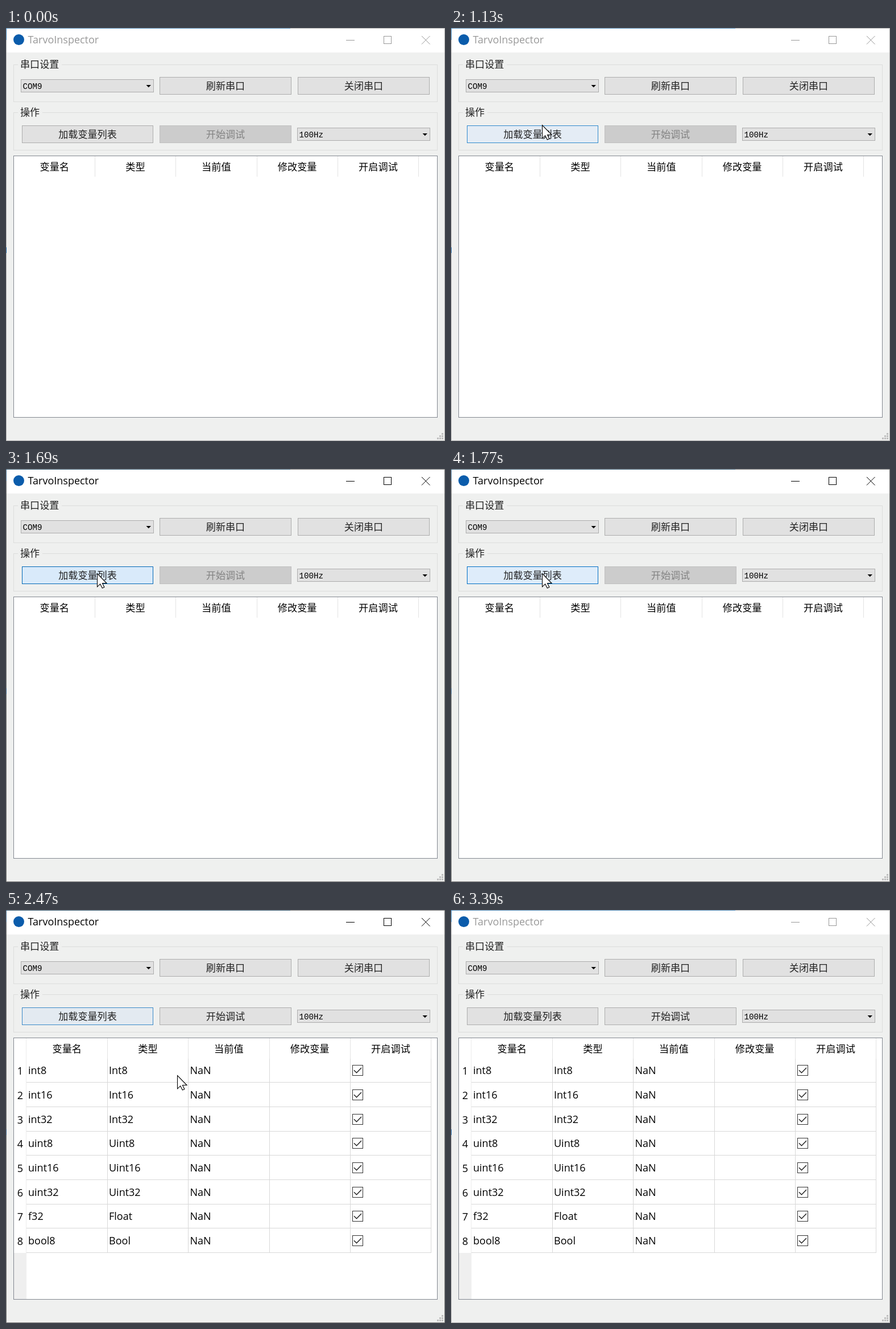
An HTML page that plays this animation: 772 by 725 pixels, repeating every 3560 ms.

```html
<!DOCTYPE html>
<html lang="zh-CN">
<head>
<meta charset="utf-8">
<title>Serial variable window</title>
<style>
  html, body { margin: 0; width: 100%; height: 100%; overflow: hidden; background: #eff0ef; }
  svg { display: block; width: 772px; height: 725px; }
  rect, .line { shape-rendering: crispEdges; }
  .ui { font: 18px "Open Sans", "Noto Sans", sans-serif; }
  .head { font: 17.2px "Noto Sans CJK SC", "Noto Sans CJK", sans-serif; }
  .song { font: 300 17.1px "Noto Sans CJK SC Light", "Noto Sans CJK SC DemiLight", "Noto Sans CJK SC", "Noto Sans CJK", sans-serif; }
  .mono { font: 14.2px "Liberation Mono", monospace; }
  .mid { text-anchor: middle; }
</style>
</head>
<body>
<svg id="stage" viewBox="0 0 772 725" xmlns="http://www.w3.org/2000/svg"></svg>
<script>
const NS = "http://www.w3.org/2000/svg";
const LOOP = 3560;
const ACTIVE_AT = 1370, LOADED_AT = 1840, INACTIVE_AT = 3390;

// time, tip x, tip y; a bare time hides the pointer
const POINTER = [
  [0],
  [510, 273, 601], [590, 222, 520], [670, 172, 420], [740, 143, 340],
  [820, 134, 279], [900, 140, 232], [980, 150, 200],
  [1050, 157, 180], [1130, 160, 170], [1220, 160, 183],
  [2320, 167, 190], [2390, 225, 233], [2470, 301, 290], [2530, 357, 367],
  [2610, 415, 470], [2690, 460, 580], [2770, 491, 700],
  [2840]
];

// time, fill, border
const LOAD_BUTTON = [
  [0, "#e1e1e1", "#adadad"],
  [1050, "#e2e5e8", "#8ba1b3"],
  [1130, "#e4ecf5", "#3089cd"],
  [1220, "#e5f1fb", "#0078d7"],
  [1450, "#d9ebf9", "#0068b8"],
  [1530, "#cce4f7", "#005499"],
  [1610, "#d2e7f8", "#005ea9"],
  [1690, "#d9eafa", "#0067b6"],
  [1770, "#deecfa", "#006ec4"],
  [1840, "#e1eefa", "#0074cf"],
  [2320, "#e5f1fb", "#0078d7"],
  [2390, "#e4eef7", "#1b7ed1"],
  [2470, "#e3eaf1", "#3a89c8"],
  [2530, "#e2e6ea", "#7198b9"],
  [2610, "#e1e3e5", "#98a5b0"],
  [2690, "#e1e1e1", "#adadad"]
];

const HEADERS = ["变量名", "类型", "当前值", "修改变量", "开启调试"];
const ROWS = ["int8", "int16", "int32", "uint8", "uint16", "uint32", "f32", "bool8"];
const TYPES = ["Int8", "Int16", "Int32", "Uint8", "Uint16", "Uint32", "Float", "Bool"];
const COL = 142.3, ROW = 42.7;
const INK = "#222";

const stage = document.getElementById("stage");

function add(parent, tag, attrs, text) {
  const el = document.createElementNS(NS, tag);
  for (const key in attrs) el.setAttribute(key, attrs[key]);
  if (text) el.textContent = text;
  parent.appendChild(el);
  return el;
}
const group = (parent = stage) => add(parent, "g", {});
const fillBox = (p, x, y, width, height, fill) => add(p, "rect", { x, y, width, height, fill });
const frame = (p, x, y, w, h, fill, stroke) =>
  add(p, "rect", { x: x + .5, y: y + .5, width: w - 1, height: h - 1, fill, stroke });
const label = (p, x, y, text, cls, fill = "#000") => add(p, "text", { x, y, class: cls, fill }, text);

function button(x, y, w, h, text) {
  const box = frame(stage, x, y, w, h, "#e1e1e1", "#adadad");
  const caption = label(stage, x + w / 2, y + 22, text, "song mid", INK);
  return { box, caption };
}

function combo(x, y, text) {
  frame(stage, x, y, 234, 23, "#e1e1e1", "#adadad");
  label(stage, x + 3.5, y + 17, text, "mono");
  add(stage, "path", { d: `M${x + 220.5} ${y + 10}h8.5l-4.25 4.25z` });
}

function fieldset(y, h, title, gap) {
  frame(stage, 13, y, 746, h, "none", "#dcdddc");
  fillBox(stage, 21, y - 1, gap, 3, "#eff0ef");
  label(stage, 25, y + 5.5, title, "song", INK);
}

function headerRow(parent, left) {
  HEADERS.forEach((text, i) => {
    label(parent, left + COL * (i + .5) + .4, 250, text, "head mid");
    fillBox(parent, Math.round(left + COL * (i + 1)), 225, 1, 36, "#e3e3e3");
  });
}

function filledTable(parent) {
  headerRow(parent, 35.7);
  fillBox(parent, 14, 602, 22, 81, "#efefef");
  fillBox(parent, 35, 225, 1, 377, "#ececec");
  for (let i = 1; i <= HEADERS.length; i++)
    fillBox(parent, Math.round(35.7 + COL * i), 261, 1, 341, "#d8d8d8");
  ROWS.forEach((name, i) => {
    const dy = Math.round(ROW * i + .2), base = 288 + dy;
    label(parent, 25, base + 1, String(i + 1), "ui mid");
    label(parent, 39, base, name, "ui");
    label(parent, 181, base, TYPES[i], "ui");
    label(parent, 323.5, base, "NaN", "ui");
    fillBox(parent, 36, 302 + dy, 712, 1, "#d8d8d8");
    frame(parent, 609, 272 + dy, 19, 19, "#fff", "#333");
    add(parent, "path", {
      d: `M612 ${281.3 + dy}l4.5 4.5 8.5-8.7`,
      fill: "none", stroke: "#222", "stroke-width": 1.5
    });
  });
}

// window
fillBox(stage, 0, 0, 772, 725, "#eff0ef");
fillBox(stage, 1, 1, 770, 42, "#fff");
const edge = frame(stage, 0, 0, 772, 725, "none", "#aaa");
const topEdge = fillBox(stage, 0, 0, 500, 1, "#4d87b5");
const sideEdge = group();
fillBox(sideEdge, 0, 1, 1, 20, "#3c7fb5");
fillBox(sideEdge, 0, 385, 1, 10, "#1d62a0");

add(stage, "circle", { cx: 22.5, cy: 20.5, r: 9.5, fill: "#0b5cab" });
const title = label(stage, 38.5, 27, "TarvoInspector", "ui");
const controls = add(stage, "g", { fill: "none" });
add(controls, "path", { d: "M598 21.5h15M664.5 14.5h13v13h-13z", class: "line" });
add(controls, "path", { d: "M731 14l14.5 14.5M745.5 14l-14.5 14.5" });

fieldset(64, 66, "串口设置", 77);
combo(26, 90, "COM9");
button(270, 86, 232, 31, "刷新串口");
button(513, 86, 232, 31, "关闭串口");

fieldset(148, 67, "操作", 43);
const load = button(28, 171, 231, 31, "加载变量列表");
const start = button(270, 171, 232, 31, "开始调试");
combo(512, 175, "100Hz");

frame(stage, 13, 224, 746, 460, "#fff", "#828790");
const emptyView = group();
headerRow(emptyView, 13.7);
const fullView = group();
filledTable(fullView);

// size grip
for (let r = 0; r < 3; r++)
  for (let c = 2 - r; c < 3; c++)
    fillBox(stage, 758 + c * 4, 711 + r * 4, 3, 3, "#bfbfbf");

const pointer = add(stage, "path", {
  d: "M0 0V23.3L5.2 18.4 8.8 25.5 12.4 23.9 9 17H16.5Z",
  fill: "#fff", stroke: "#000", "stroke-width": 1.1
});

const at = (steps, t) => steps.findLast(step => step[0] <= t);

function paint(el, fill, stroke) {
  el.setAttribute("fill", fill);
  el.setAttribute("stroke", stroke);
}

function render(t) {
  const active = t >= ACTIVE_AT && t < INACTIVE_AT;
  const loaded = t >= LOADED_AT;

  title.setAttribute("fill", active ? "#000" : "#999");
  controls.setAttribute("stroke", active ? "#000" : "#999");
  edge.setAttribute("stroke", active ? "#707070" : "#aaa");
  topEdge.setAttribute("fill", active ? "#34566c" : "#4d87b5");
  sideEdge.setAttribute("opacity", active ? .6 : 1);

  const [, fill, stroke] = at(LOAD_BUTTON, t);
  paint(load.box, fill, stroke);
  paint(start.box, loaded ? "#e1e1e1" : "#ccc", loaded ? "#adadad" : "#bfbfbf");
  start.caption.setAttribute("fill", loaded ? INK : "#838383");

  emptyView.style.display = loaded ? "none" : "";
  fullView.style.display = loaded ? "" : "none";

  const [, x, y] = at(POINTER, t);
  pointer.style.display = x === undefined ? "none" : "";
  if (x !== undefined) pointer.setAttribute("transform", `translate(${x + .5} ${y + .5})`);
}

const begin = performance.now();
function tick() {
  render((performance.now() - begin) % LOOP);
  requestAnimationFrame(tick);
}
tick();
</script>
</body>
</html>
```
